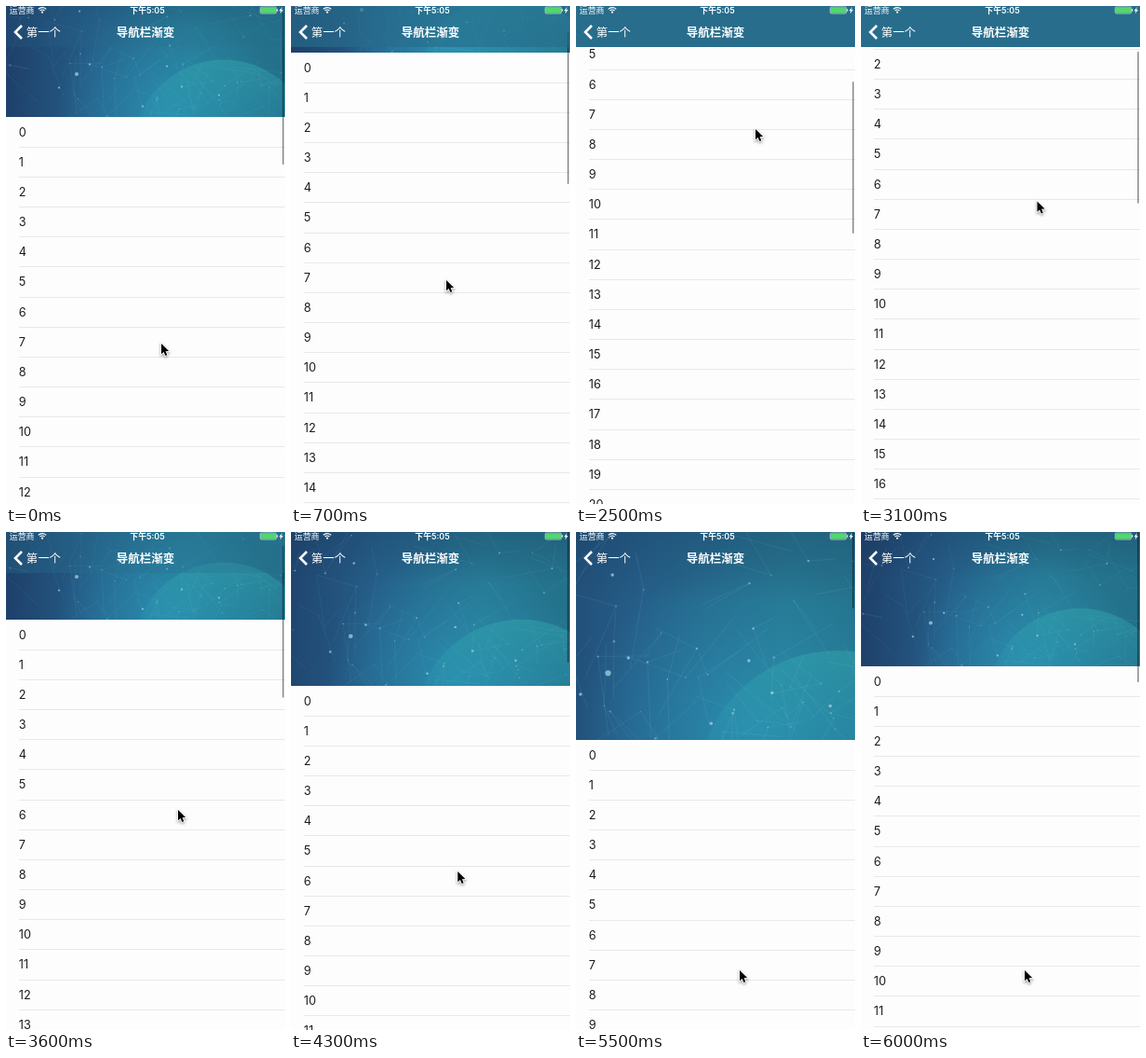
Recreate the animation shown at these times as an HTML page with a canvas. Size 300 by 534 pixels, loop 6100 ms.

```html
<!DOCTYPE html>
<html lang="zh">
<head>
<meta charset="utf-8">
<style>
  html, body { margin: 0; width: 100%; height: 100%; overflow: hidden; background: #fefdfe; }
  canvas { display: block; width: 300px; height: 534px; }
</style>
</head>
<body>
<canvas id="stage"></canvas>
<script>
const W = 300, H = 534, LOOP = 6100, STEP = 100;
const NAV = 44, ROW = 32.17, ROWS = 50;
const REST = 142, CROP = 2.4, PHOTO = REST + CROP;
const RELEASE = 5450, SPRING = .01;
const FONT = 'Inter, "Noto Sans CJK SC", "Noto Sans CJK", sans-serif';

const canvas = document.getElementById('stage');
const ctx = canvas.getContext('2d');
const ratio = window.devicePixelRatio || 1;
canvas.width = W * ratio;
canvas.height = H * ratio;

// Where the pointer and the top of the list are at the turns of the drag
const poses = [
  { t: 0, x: 167, y: 362, top: 119 },
  { t: 700, x: 167, y: 294, top: 50 },
  { t: 1500, x: 166, y: 233, top: -11 },
  { t: 2500, x: 193, y: 132, top: -125 },
  { t: 3600, x: 185, y: 298, top: 94 },
  { t: 5000, x: 176, y: 424, top: 213 },
  { t: RELEASE, x: 176, y: 470, top: 231 },
];

// Smooth curve through one property of the poses, without overshoot
function track(key) {
  const slopes = poses.slice(1).map((p, i) => (p[key] - poses[i][key]) / (p.t - poses[i].t));
  const tangents = poses.map((_, i) => {
    const a = slopes[i - 1] ?? slopes[i], b = slopes[i] ?? a;
    return a * b > 0 ? 2 * a * b / (a + b) : 0;
  });
  return t => {
    t = Math.min(t, RELEASE);
    const i = Math.max(0, poses.findIndex(p => p.t >= t) - 1);
    const from = poses[i], to = poses[i + 1];
    const d = to.t - from.t, u = (t - from.t) / d, w = 1 - u;
    return from[key] * (1 + 2 * u) * w * w + d * tangents[i] * u * w * w
         + to[key] * u * u * (3 - 2 * u) - d * tangents[i + 1] * u * u * w;
  };
}

const pointerX = track('x'), pointerY = track('y'), dragTop = track('top');

// Follows the drag, then springs back to rest
function listTop(t) {
  const s = SPRING * Math.max(0, t - RELEASE);
  const top = dragTop(t);
  return Math.round(s ? REST + (top - REST) * (1 + s) * Math.exp(-s) : top);
}

function randomizer(seed) {
  return () => (seed = (seed * 16807) % 2147483647) / 2147483647;
}

function line(x1, y1, x2, y2) {
  ctx.beginPath();
  ctx.moveTo(x1, y1);
  ctx.lineTo(x2, y2);
  ctx.stroke();
}

function disc(x, y, r) {
  ctx.beginPath();
  ctx.arc(x, y, r, 0, Math.PI * 2);
  ctx.fill();
}

function gradient(g, ...colors) {
  colors.forEach((c, i) => g.addColorStop(i / (colors.length - 1), c));
  return g;
}

function wash(g, ...colors) {
  ctx.fillStyle = gradient(g, ...colors);
  ctx.fillRect(-W / 2, 0, W, PHOTO);
}

// Faint threads and dots, denser towards the bottom of the photo
function drawStars() {
  const rand = randomizer(71);
  ctx.lineWidth = .4;
  for (let i = 0; i < 60; i++) {
    const x = (rand() - .5) * W, y = PHOTO * Math.sqrt(rand());
    ctx.strokeStyle = 'rgba(150,215,232,.16)';
    for (let n = 0; n < 2; n++) {
      const angle = rand() * Math.PI * 2, length = 15 + rand() * 45;
      line(x, y, x + Math.cos(angle) * length, y + Math.sin(angle) * length);
    }
    ctx.fillStyle = `rgba(180,222,236,${.2 + rand() * .4})`;
    disc(x, y, .3 + rand() * .6);
  }
  ctx.fillStyle = 'rgba(165,208,228,.75)';
  disc(-74, 98.5, 2);
  for (const [x, y] of [[-93, 113], [-60, 88], [-71, 31], [-3, 133], [39, 112], [23, 90], [79, 121]]) disc(x, y, 1.1);
}

function drawPhoto(top) {
  const scale = Math.max(1, (top + CROP) / PHOTO);
  ctx.save();
  ctx.translate(W / 2, top - PHOTO * scale);
  ctx.scale(scale, scale);
  ctx.beginPath();
  ctx.rect(-W / 2, 0, W, PHOTO);
  ctx.clip();

  wash(ctx.createLinearGradient(-150, 50, 150, 65), '#1e3f69', '#255f89', '#267690', '#23708a');
  wash(ctx.createRadialGradient(25, 140, 0, 25, 140, 120), 'rgba(45,160,196,.6)', 'rgba(45,160,196,0)');
  wash(ctx.createLinearGradient(0, 0, 0, 50), 'rgba(26,58,92,.3)', 'rgba(26,58,92,0)');
  ctx.fillStyle = gradient(ctx.createLinearGradient(0, 83, 0, PHOTO), 'rgba(50,166,172,.5)', 'rgba(42,150,175,.3)');
  disc(84, 180, 97);
  drawStars();
  ctx.restore();
}

function text(s, x, y, size, weight = 400, align = 'left') {
  ctx.font = `${weight} ${size}px ${FONT}`;
  ctx.textAlign = align;
  ctx.fillText(s, x, y);
}

function drawRows(top) {
  for (let i = 0; i < ROWS; i++) {
    const y = top + i * ROW;
    if (y < -ROW || y > H) continue;
    ctx.fillStyle = '#1c1c1c';
    text(i, 13.8, y + 20.6, 12.7);
    ctx.fillStyle = '#e8e7ec';
    ctx.fillRect(14, Math.round(y + ROW - .5), W - 14, 1);
  }
}

function drawScrollbar(top) {
  const end = 206.2 - .303 * top - Math.max(0, top - REST) * .7;
  const start = Math.max(0, 43.2 - .303 * top);
  ctx.fillStyle = 'rgba(0,0,0,.35)';
  ctx.beginPath();
  ctx.roundRect(297, start, 2, end - start, 1);
  ctx.fill();
}

function polygon(points) {
  ctx.beginPath();
  points.forEach(([x, y]) => ctx.lineTo(x, y));
  ctx.closePath();
}

function drawStatus() {
  ctx.fillStyle = ctx.strokeStyle = '#fff';
  text('运营商', 3.8, 8, 8.9);
  text('下午5:05', 152, 8, 8.9, 600, 'center');

  ctx.lineWidth = 1.2;
  for (const r of [3.4, 5.8]) {
    ctx.beginPath();
    ctx.arc(39, 7.4, r, -Math.PI * .76, -Math.PI * .24);
    ctx.stroke();
  }
  disc(39, 6.7, 1.1);

  ctx.lineWidth = .6;
  ctx.beginPath();
  ctx.roundRect(273.3, 1, 17.4, 7, 1.4);
  ctx.stroke();
  ctx.fillRect(291.2, 3.2, 1, 2.6);
  ctx.fillStyle = '#52d86a';
  ctx.fillRect(274, 1.6, 16, 5.8);
  ctx.fillStyle = '#fff';
  polygon([[297, 1], [293.6, 5.2], [295.5, 5.2], [294.6, 8.4], [298, 4], [296.1, 4]]);
  ctx.fill();
}

function drawNav(top) {
  ctx.globalAlpha = Math.min(1, Math.max(0, (REST - top) / REST));
  ctx.fillStyle = '#286d8c';
  ctx.fillRect(0, 0, W, NAV);
  ctx.globalAlpha = 1;
  drawStatus();

  ctx.lineWidth = 2.6;
  ctx.beginPath();
  ctx.moveTo(17, 21);
  ctx.lineTo(10, 28);
  ctx.lineTo(17, 35);
  ctx.stroke();
  text('第一个', 21.8, 32.5, 12.4);
  text('导航栏渐变', 150, 32.5, 12.5, 600, 'center');
}

function drawPointer(x, y) {
  ctx.save();
  ctx.translate(x, y);
  ctx.scale(.9, .9);
  polygon([[0, 0], [0, 12.5], [2.9, 9.9], [4.9, 14.4], [7, 13.5], [5.1, 9.1], [9, 9]]);
  ctx.shadowColor = 'rgba(0,0,0,.4)';
  ctx.shadowBlur = 3 * ratio;
  ctx.shadowOffsetY = 1.5 * ratio;
  ctx.lineWidth = 1.8;
  ctx.strokeStyle = '#fff';
  ctx.stroke();
  ctx.shadowColor = 'transparent';
  ctx.fillStyle = '#000';
  ctx.fill();
  ctx.restore();
}

function draw(t) {
  const top = listTop(t);
  ctx.setTransform(ratio, 0, 0, ratio, 0, 0);
  ctx.fillStyle = '#fefdfe';
  ctx.fillRect(0, 0, W, H);
  drawRows(top);
  if (top > 0) drawPhoto(top);
  drawScrollbar(top);
  drawNav(top);
  drawPointer(pointerX(t), pointerY(t));
}

const begin = performance.now();
function frame() {
  const t = (performance.now() - begin) % LOOP;
  draw(Math.floor(t / STEP) * STEP);
  requestAnimationFrame(frame);
}
frame();
</script>
</body>
</html>
```
